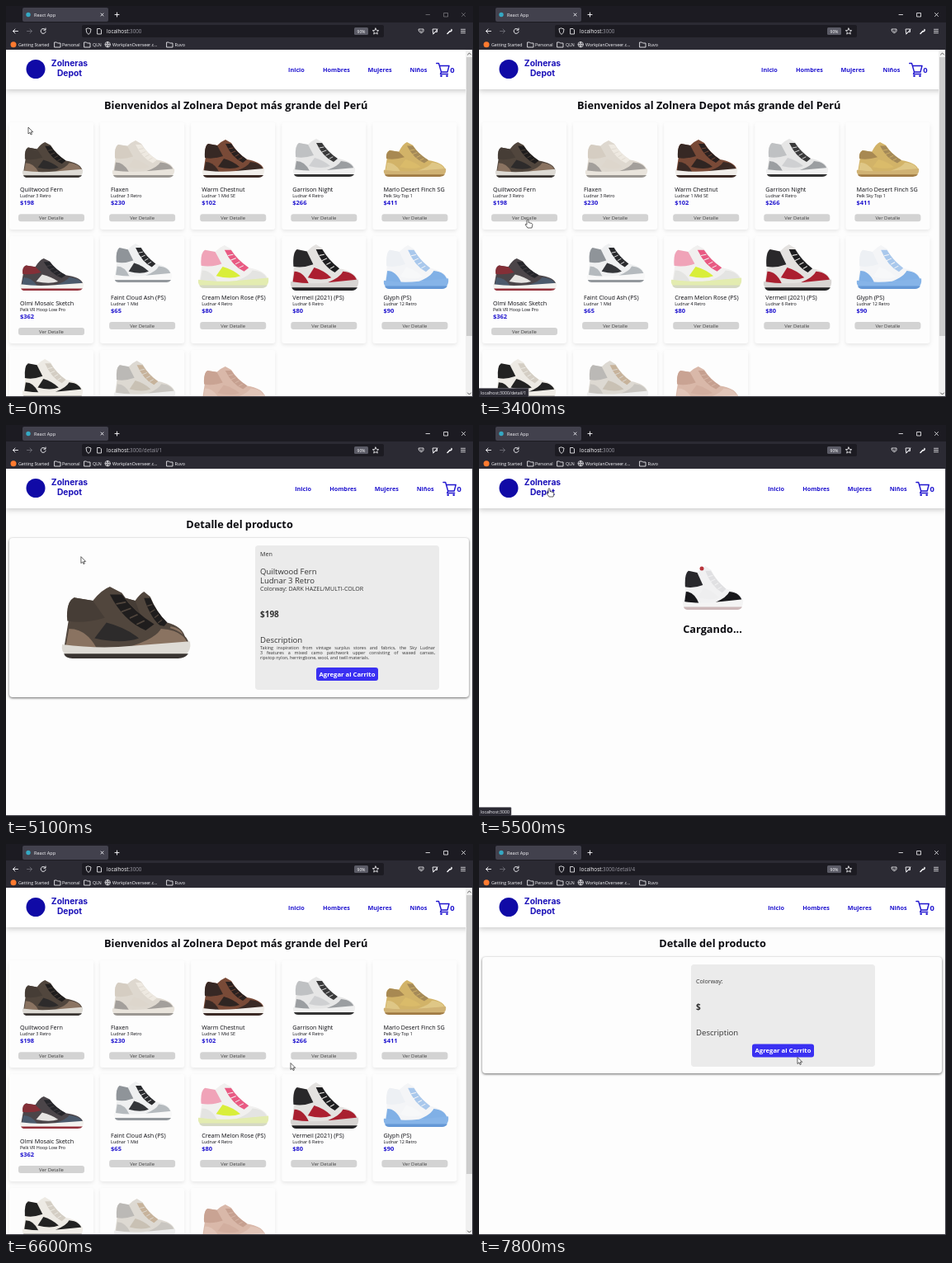
These frames come from a looping animation (566x474 px, 8 s). An HTML page:

```html
<!DOCTYPE html>
<html lang="es">
<head>
<meta charset="utf-8">
<title>React App</title>
<style>
  html, body { margin: 0; width: 100%; height: 100%; overflow: hidden; background: #fdfdfd; }
  svg { display: block; width: 566px; height: 474px; font-family: "Open Sans", "Noto Sans", sans-serif; }
  .line { fill: none; stroke: #fbfbfe; stroke-linecap: round; stroke-linejoin: round; }
  .card { fill: #fdfdfd; filter: drop-shadow(0 2px 2px #00000016); }
  .sheet { fill: #fdfdfd; filter: drop-shadow(0 1.5px 1.5px #0009); }
  .copy { font-size: 5.4px; line-height: 6.3px; color: #333; white-space: nowrap; }
  .copy div { text-align-last: justify; }
  .copy div:last-child { text-align-last: left; }
</style>
</head>
<body>
<svg id="stage" viewBox="0 0 566 474" xmlns="http://www.w3.org/2000/svg"></svg>
<script>
const BLUE = '#2015cf', INK = '#0b0b10', LIGHT = '#fbfbfe', BORDER = '#3d3c45';

const rect = (x, y, w, h, fill, r = 0, extra = '') =>
  `<rect x="${x}" y="${y}" width="${w}" height="${h}" rx="${r}" fill="${fill}" ${extra}/>`;
const dot = (x, y, r, fill) => `<circle cx="${x}" cy="${y}" r="${r}" fill="${fill}"/>`;
const path = (d, fill) => `<path d="${d}" fill="${fill}"/>`;
const line = (d, width = .9, color = LIGHT) =>
  `<path class="line" d="${d}" style="stroke:${color};stroke-width:${width}"/>`;
const text = (x, y, size, str, fill = INK, weight = 400, anchor = 'start', extra = '') =>
  `<text x="${x}" y="${y}" font-size="${size}" fill="${fill}" font-weight="${weight}" text-anchor="${anchor}" ${extra}>${str}</text>`;
const group = (id, content, extra = '') => `<g id="${id}" ${extra}>${content}</g>`;

// Sneaker in a 76 x 46 box, toe to the right; dip is the depth of the ankle opening
function shoe([x, y, w, h, dip = 7], palette) {
  const [body, collar, panel, toe, sole, tread, laces] = palette.split(' ').map(c => '#' + c);
  const heel = dip - 2;
  return `<g transform="translate(${x} ${y}) scale(${w / 76} ${h / 46})">` +
    path(`M2 40L5 20Q3 ${heel + 3} 8 ${heel}L19 ${dip}Q24 2 29 0L36 4Q43 16 55 24Q72 27 75 35V40Z`, body) +
    path(`M4 22Q3 ${heel + 3} 8 ${heel}L19 ${dip}L26 20Q14 24 4 22Z`, collar) +
    path('M20 33L27 23Q38 26 46 33Q36 37 20 33Z', panel) +
    path('M3 39L5 27Q15 27 21 39Z', toe) +
    path('M42 38Q56 33 59 27Q73 28 75 38Z', toe) +
    path('M29 5L36 5Q43 16 55 24L50 28Q37 22 29 5Z', laces) +
    line('M33 11l5-1M36 16l5-2M41 20l4-2M45 24l4-2', .9, body) +
    path('M1 37Q22 40 42 38L76 35Q77 41 73 44H4Q0 42 1 37Z', sole) +
    path('M2 43H75Q73 46 69 46H7Q3 46 2 43Z', tread) + '</g>';
}

// Palette: body, collar, panel, toe, sole, tread, laces
const products = [
  ['Quiltwood Fern', 'Ludnar 3 Retro', 198, [19, 165, 74, 43, 9], '51463d 463d36 2d2b2b 8a7361 dedbd5 393431 1f1d1d'],
  ['Flaxen', 'Ludnar 3 Retro', 230, [128, 163, 76, 45], 'ded8cf d5cdc2 ddd6cc a39f9b e9e4dc 9b9792 eee9e1'],
  ['Warm Chestnut', 'Ludnar 1 Mid SE', 102, [237, 162, 76, 46], '794a37 362824 2f2522 3a2a25 f1eeea 3b2a25 2a2120'],
  ['Garrison Night', 'Ludnar 4 Retro', 266, [347, 161, 76, 46], 'e6e6e6 bfc1c3 cfd0d2 9b9ea1 f0f0f0 333333 3a3a3b'],
  ['Marlo Desert Finch SG', 'Pelk Sky Top 1', 411, [457, 165, 76, 42, 13], 'd2b368 a88952 dabb6a dfc786 d0b274 a07b45 a58a58'],
  ['Olmi Mosaic Sketch', 'Pelk VR Hoop Low Pro', 362, [16, 306, 78, 39, 12], '4b4549 842f37 e6e4e2 4b5a6c f3f2ef 93303a 26262b'],
  ['Faint Cloud Ash (PS)', 'Ludnar 1 Mid', 65, [130, 288, 71, 47], 'eff0f1 8f9499 34363a b5babe f8f8f8 93989d 2a2b2e'],
  ['Cream Melon Rose (PS)', 'Ludnar 4 Retro', 80, [232, 290, 86, 52], 'f1f0ef f0a3b8 d9ee3a e4e4e2 e3ecb0 d5d9c4 e95a83'],
  ['Vermeil (2021) (PS)', 'Ludnar 6 Retro', 80, [344, 289, 83, 56], 'e4e2e0 29282a ac1f30 a92030 d8d5d3 232325 1e1e20'],
  ['Glyph (PS)', 'Ludnar 12 Retro', 90, [457, 290, 79, 53], 'f4f5f7 edf0f4 f7f8f9 80b0e6 86b4e8 6598d6 a9c8ec'],
  ['', '', 0, [19, 428, 74, 48], 'edeae4 222222 222222 222222 f1eee8 222222 d4cec4'],
  ['', '', 0, [130, 430, 75, 48], 'ddd9d2 bbb9b6 c9c1b4 c9c6c1 eeeeee b99e7a c7b39b'],
  ['', '', 0, [236, 437, 78, 45], 'd9b8a9 c9a393 d2ae9f e1c5b8 e7d0c5 c59f90 c6a090'],
];

function productCard([name, model, price, box, palette], i) {
  const dx = i % 5 * 110.1, row = Math.floor(i / 5);
  const y = [225, i > 5 ? 355.7 : 362.7, 500][row];
  return rect(4 + dx, 141 + row * 138, 102, 130, '#fdfdfd', 3, 'class="card"') +
    shoe(box, palette) +
    (row > 1 ? '' :
      text(17 + dx, y, 7.2, name) + text(17 + dx, y + 7.1, 5.4, model) +
      text(17 + dx, y + 16.2, 7.5, '$' + price, BLUE, 700) +
      rect(15 + dx, y + 27.3, 80, 9, '#d3d3d3', 3) +
      text(55 + dx, y + 34, 5.9, 'Ver Detalle', '#444', 400, 'middle'));
}

const folder = x => line(`M${x} 44h2.5l1 1h3.5v5h-7z`, .8);

function browser() {
  return rect(0, 0, 566, 20, '#1c1b22') + rect(0, 20, 566, 33, '#2b2a33') +
    rect(20, 2, 104, 17, '#42414d', 2) + dot(27, 10.5, 2.7, '#35a9c4') +
    text(34, 12.8, 5.6, 'React App', LIGHT) +
    line('M115 9l3 3m0-3l-3 3M132 10.5h5m-2.5-2.5v5') +
    group('controls', line('M509 10.5h4.5M531 8.5h4.5v4.5h-4.5zM552.5 8.5l4 4m0-4l-4 4', .8)) +
    line('M14.5 30.5H8.5l2.5-2.5m-2.5 2.5l2.5 2.5') +
    line('M25.5 30.5h6l-2.5-2.5m2.5 2.5l-2.5 2.5', .9, '#6d6c75') +
    line('M47.5 28.5a3 3 0 1 0 .6 2.7M48 27v2.2h-2.2') +
    rect(92, 23, 366, 15, '#1c1b22', 2) +
    line('M100 27l3 1q0 5-3 6.5q-3-1.5-3-6.5zM111 27.5h3l1.5 1.5v5h-4.5z', .8) +
    `<text y="33" x="122" font-size="6.3" fill="${LIGHT}">localhost<tspan id="route" fill="#9a99a3"></tspan></text>` +
    rect(422, 26, 17, 9, '#5b5b66', 1.5) + text(430.5, 32.6, 5, '90%', LIGHT, 400, 'middle') +
    line('M448 27l1.1 2.4 2.6.3-2 1.8.6 2.6-2.3-1.3-2.3 1.3.6-2.6-2-1.8 2.6-.3z', .8) +
    line('M500.5 28h5.5v2.5q-2.7 4.5-5.5 0zM502 30l1.3 1.2 1.3-1.2', .8) +
    line('M517.5 28h5v3.5h-2l-2.5 2zM518 34l5-6', .9) +
    line('M535 33.5l3-3', 1.5) + line('M538 30.5a1.5 1.5 0 0 0 2-2', 1.5) +
    line('M551.5 28.3h5m-5 2.2h5m-5 2.2h5', .8) +
    dot(9, 46.7, 3.5, '#ff7a2f') + text(15, 48.9, 5.3, 'Getting Started', LIGHT) +
    folder(59) + text(68, 48.9, 5.3, 'Personal', LIGHT) +
    folder(95) + text(105, 48.9, 5.3, 'QLN', LIGHT) +
    line('M120 46.7a3.2 3.2 0 1 0 6.4 0a3.2 3.2 0 1 0-6.4 0h6.4M123.2 43.5q-2.5 3.2 0 6.4q2.5-3.2 0-6.4', .7) +
    text(129, 48.9, 5.3, 'WorkplanOverseer.c...', LIGHT) +
    folder(195) + text(204.5, 48.9, 5.3, 'Ruvo', LIGHT);
}

function header() {
  const logo = 'font-family="Inter, sans-serif"';
  const nav = [[342, 'Inicio'], [384, 'Hombres'], [438.5, 'Mujeres'], [489.5, 'Niños']]
    .map(([x, label]) => text(x, 80, 7.25, label, BLUE, 700)).join('');
  return rect(0, 53, 566, 48, '#fff', 0, 'style="filter:drop-shadow(0 2px 3px #0003)"') +
    dot(36, 76.5, 11.5, '#100aa6') +
    text(77, 73, 10.3, 'Zolneras', '#1a10b8', 700, 'middle', logo) +
    text(77, 85, 10.3, 'Depot', '#1a10b8', 700, 'middle', logo) +
    group('nav', nav + line('M521.7 69.5h2.8l3 10.5h7.5l2-7.5h-11.7M527.5 80l-1 2.5h9', 1.4, BLUE) +
      dot(527.5, 84.8, 1.3, BLUE) + dot(534.5, 84.8, 1.3, BLUE) + text(538.3, 81.3, 9.4, '0', BLUE, 700));
}

const scrollbar = () => rect(557, 53, 9, 421, '#f0f0f0') + rect(558, 62, 7, 338, '#cdcdcd') +
  line('M559.5 59l2-2 2 2M559.5 469l2 2 2-2', 1, '#555');

const heading = (x, y, str) => text(x, y, 12.75, str, INK, 700, 'middle');

const home = () => heading(278.7, 124.5, 'Bienvenidos al Zolnera Depot más grande del Perú') +
  products.map(productCard).join('');

const loading = () =>
  shoe([246, 171, 74, 53], 'f1f1f2 29292d eeeeef 18181b f4f4f4 cdb9ba e0e0e2') +
  dot(270, 174, 2.5, '#b8353b') + heading(283, 251.5, 'Cargando...');

function detail(full) {
  const x = full ? 302 : 257, left = x + 6, base = full ? 264 : 232;
  const buttonY = full ? 294 : 242.5;
  const panelText = (y, size, str, weight) => text(left, y, size, str, '#333', weight);
  const [name, model, price, , palette] = products[0];
  return heading(283, 124.5, 'Detalle del producto') +
    rect(4, 137, 557, full ? 193 : 141, '#fdfdfd', 4, 'class="sheet"') +
    rect(x, 146, 223, full ? 175 : 124, '#ebebeb', 4) +
    panelText(base - 62.7, 7.1, 'Colorway:' + (full ? ' DARK HAZEL/MULTI-COLOR' : '')) +
    panelText(base - 31.2, 10, full ? '$' + price : '$', 700) +
    panelText(base, 9.6, 'Description') +
    rect(x + 74, buttonY, 75, 16, '#3a30f2', 3) +
    text(x + 111.5, buttonY + 10.7, 7.7, 'Agregar al Carrito', '#fff', 700, 'middle') +
    (!full ? '' :
      panelText(158.5, 7.2, 'Men') + panelText(181, 9.5, name) + panelText(192.3, 9.5, model) +
      shoe([136, 202, 82, 72], palette) + shoe([66, 196, 157, 87, 9], palette) +
      `<foreignObject x="${left}" y="266.5" width="212" height="22">
        <div xmlns="http://www.w3.org/1999/xhtml" class="copy">
          <div>Taking inspiration from vintage surplus stores and fabrics, the Sky Ludnar</div>
          <div>3 features a mixed camo patchwork upper consisting of waxed canvas,</div>
          <div>ripstop nylon, herringbone, wool, and twill materials.</div>
        </div></foreignObject>`);
}

const outline = 'fill="#fff" stroke="#222" stroke-width=".7" stroke-linejoin="round"';
document.getElementById('stage').innerHTML =
  rect(0, 0, 566, 474, '#fdfdfd') +
  group('home', home()) + group('loading', loading()) +
  group('empty', detail(false)) + group('full', detail(true)) +
  header() + group('scrollbar', scrollbar()) + browser() +
  rect(565, 53, 1, 421, BORDER) + rect(0, 473, 566, 1, BORDER) +
  group('status', rect(-1, 463.5, 40, 12, '#2b2a33', 1, 'id="statusBox" stroke="#77767e" stroke-width=".6"') +
    text(2, 470.8, 5.2, '', LIGHT, 400, 'start', 'id="statusText"')) +
  group('arrow', `<path ${outline} d="M0 0V8l1.9-1.7 1.2 2.7 1.3-.6-1.2-2.6h2.5z"/>`) +
  group('hand', `<path ${outline} d="M-1 1q1-1.5 2 0v3l4 1q1 .4.8 2l-.8 3.5h-5l-3-4q.3-1.3 2 0z"/>`);

const el = id => document.getElementById(id);
const show = (id, on) => el(id).setAttribute('display', on ? 'inline' : 'none');

const LOOP = 8000, FOCUS = 1400;
// [start, scene, route]
const scenes = [
  [0, 'home', ''], [3600, 'empty', '/detail/1'], [4000, 'full', '/detail/1'],
  [5400, 'loading', ''], [5800, 'home', ''], [7600, 'empty', '/detail/4'],
];
// [time, x, y]
const pointer = [
  [0, 27, 147], [100, 27, 147], [200, 30, 138], [500, 30, 138], [1300, 43, 77], [1900, 43, 77],
  [2800, 70, 228], [3100, 66, 248], [3300, 59, 258.5], [4300, 58.5, 258.5], [4800, 92, 180],
  [5000, 92, 175], [5400, 85, 76.5], [5800, 85, 76.5], [6600, 345, 265.5], [6700, 345, 265.5],
  [7400, 386, 258.5], [LOOP, 386, 258.5],
];

function pointerAt(t) {
  const i = pointer.findIndex(([time]) => time > t);
  const [t0, x0, y0] = pointer[i - 1], [t1, x1, y1] = pointer[i];
  const p = (t - t0) / (t1 - t0), ease = p * p * (3 - 2 * p);
  return [x0 + (x1 - x0) * ease, y0 + (y1 - y0) * ease];
}

function linkUnder(x, y, scene) {
  if (x > 20 && x < 101 && y > 64 && y < 90) return 'localhost:3000';
  const column = Math.floor((x - 15) / 110.1);
  const onButton = x - 15 - column * 110.1 < 80 && y > 252 && y < 262;
  return scene === 'home' && onButton ? `localhost:3000/detail/${column + 1}` : '';
}

function draw(now) {
  const t = Math.floor(now % LOOP / 100) * 100;
  const [, scene, route] = scenes.filter(([start]) => start <= t).pop();
  const [x, y] = pointerAt(t), link = linkUnder(x, y, scene);
  const clicked = t >= FOCUS && t < 2500 || t >= 5800 && t < 6500;

  for (const id of ['home', 'loading', 'empty', 'full']) show(id, id === scene);
  show('scrollbar', scene === 'home');
  el('nav').setAttribute('transform', `translate(${scene === 'home' ? 0 : 8.2} 0)`);
  el('controls').setAttribute('opacity', t < FOCUS ? .4 : 1);
  el('route').textContent = ':3000' + route;
  show('status', link && !clicked);
  el('statusText').textContent = link;
  el('statusBox').setAttribute('width', link.length > 14 ? 61 : 40);
  show('arrow', !link);
  show('hand', link);
  for (const id of ['arrow', 'hand']) el(id).setAttribute('transform', `translate(${x} ${y})`);
}

const begin = performance.now();
function tick() {
  draw(performance.now() - begin);
  requestAnimationFrame(tick);
}
tick();
</script>
</body>
</html>
```
